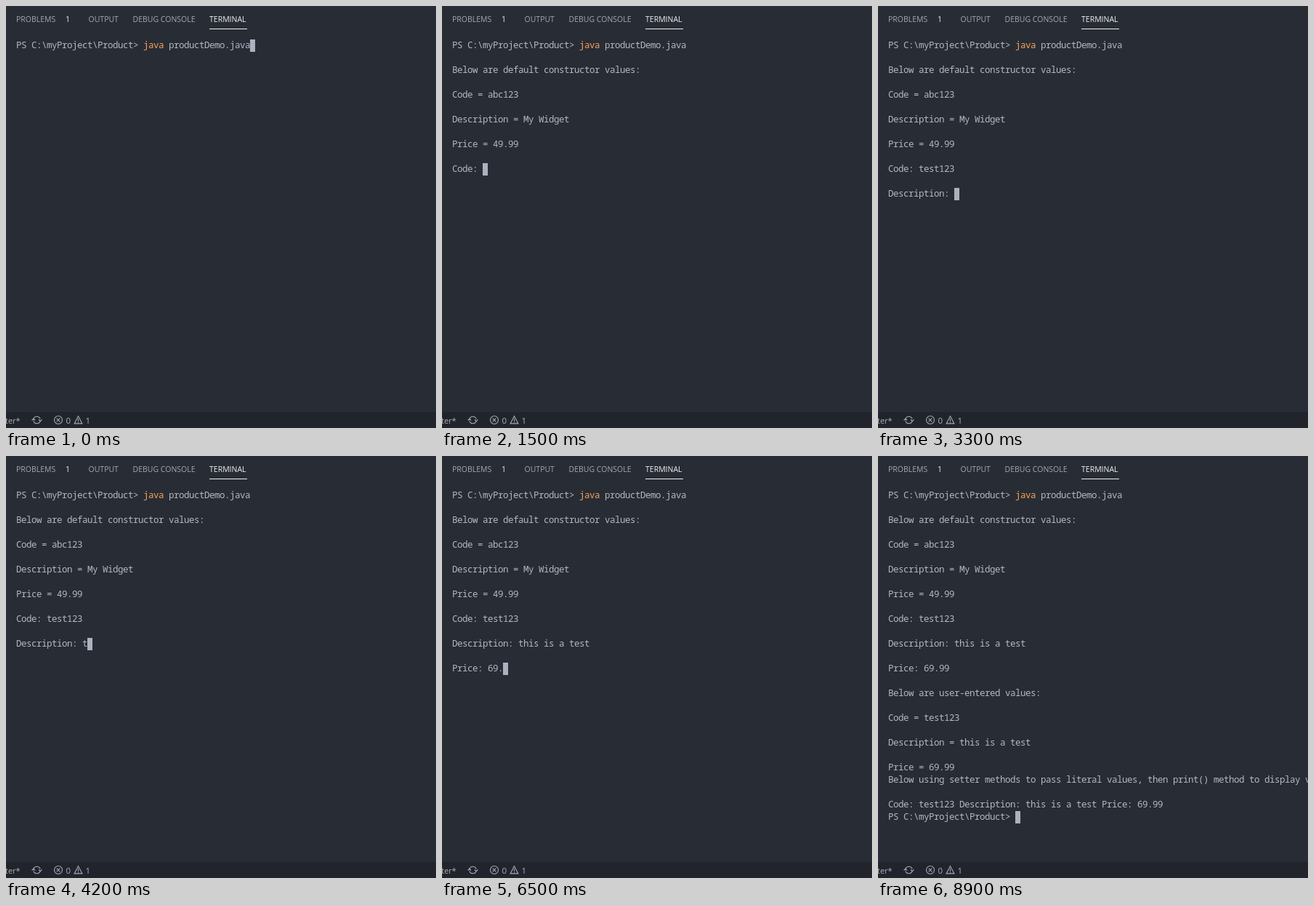
Recreate the animation shown at these times as an HTML page. Size 592x580 px, loop 9 s.

```html
<!DOCTYPE html>
<html lang="en">
<head>
<meta charset="utf-8">
<title>Terminal session</title>
<style>
  html, body { margin: 0; width: 100%; height: 100%; overflow: hidden; background: #282c34; }
  svg { display: block; }
  .term { font: 500 12.5px "Noto Sans Mono", "DejaVu Sans Mono", monospace; letter-spacing: -0.5px; fill: #b2b9c6; }
  .tabs { font: 10.5px "Open Sans", "Noto Sans", sans-serif; fill: #a4a8b0; }
  .status { font: 11.5px "Open Sans", "Noto Sans", sans-serif; fill: #a9b0bd; }
  .icons { fill: none; stroke: #a3aab7; stroke-width: 1.1; }
  .command { fill: #f0a45d; }
  .active { fill: #f0f1f4; }
  #cursor { fill: #abb2bf; }
</style>
</head>
<body>
<svg width="592" height="580" viewBox="0 0 592 580">
  <g class="tabs">
    <text x="14" y="22">PROBLEMS</text>
    <text x="82" y="22" class="active">1</text>
    <text x="113.5" y="22">OUTPUT</text>
    <text x="174.5" y="22">DEBUG CONSOLE</text>
    <text x="280" y="22" class="active">TERMINAL</text>
    <rect x="280" y="31" width="52" height="1" class="active"/>
  </g>

  <g class="term">
    <rect id="cursor" width="7" height="17"/>
    <text x="14" y="58">PS C:\myProject\Product&gt; <tspan class="command">java</tspan> productDemo.java</text>
    <g id="rows"></g>
  </g>

  <rect y="558" width="592" height="22" fill="#21252b"/>
  <g class="status">
    <text x="-1" y="574" font-size="11">ter*</text>
    <text x="82.5" y="574">0</text>
    <text x="109.5" y="574">1</text>
  </g>
  <g class="icons">
    <path d="M37.8 567.5a5 5 0 0 1 9.4 0M47.2 570.5a5 5 0 0 1-9.4 0"/>
    <path d="M45 568.5l2.2 2.2 2.2-2.2M35.6 569.5l2.2-2.2 2.2 2.2"/>
    <circle cx="72" cy="569" r="5.5"/>
    <path d="M69.7 566.7l4.6 4.6M74.3 566.7l-4.6 4.6"/>
    <path d="M99.5 563.7l5.4 10.2h-10.8zM99.5 567.2v3.6M99.5 571.6v1.2"/>
  </g>
</svg>
<script>
const LOOP = 9000, TICK = 100;
const LEFT = 14, TOP = 46, CHAR = 7, LINE = 17, BASELINE = 12;
const COMMAND_COLS = 46;

const show = (time, text) => [[time, text]];
const type = (start, step, text) => [...text].map((ch, i) => [start + i * step, ch]);

const session = [
  ...show(200, "\n"),
  ...show(1100, "\nBelow are default constructor values:\n\nCode = abc123\n\n" +
    "Description = My Widget\n\nPrice = 49.99\n\nCode: "),
  ...type(1900, 100, "test123"),
  ...show(3100, "\n\nDescription: "),
  ...type(4130, 85, "this is a test"),
  ...show(5600, "\n\nPrice: "),
  ...type(6200, 150, "69.99"),
  ...show(7400, "\n\nBelow are user-entered values:\n\nCode = test123\n\n" +
    "Description = this is a test\n\nPrice = 69.99\n" +
    "Below using setter methods to pass literal values, then print() method to display values\n\n" +
    "Code: test123 Description: this is a test Price: 69.99\n"),
  ...show(7500, "PS C:\\myProject\\Product> ")
];

const cursor = document.getElementById("cursor");
const rowCount = session.map(e => e[1]).join("").split("\n").length;
const rows = Array.from({ length: rowCount }, (_, i) => {
  const row = document.createElementNS("http://www.w3.org/2000/svg", "text");
  row.setAttribute("x", LEFT);
  row.setAttribute("y", TOP + i * LINE + BASELINE);
  return document.getElementById("rows").appendChild(row);
});

let shown = null;

function draw(now) {
  const time = Math.floor((now % LOOP) / TICK) * TICK;
  const log = session.filter(e => e[0] <= time).map(e => e[1]).join("");
  if (log === shown) return;
  shown = log;
  const lines = log.split("\n");
  rows.forEach((row, i) => { row.textContent = lines[i] || ""; });
  const last = lines.length - 1;
  const col = last ? lines[last].length : COMMAND_COLS;
  cursor.setAttribute("x", LEFT + col * CHAR);
  cursor.setAttribute("y", TOP + last * LINE);
}

function frame(now) {
  draw(now);
  requestAnimationFrame(frame);
}

draw(0);
requestAnimationFrame(frame);
</script>
</body>
</html>
```
